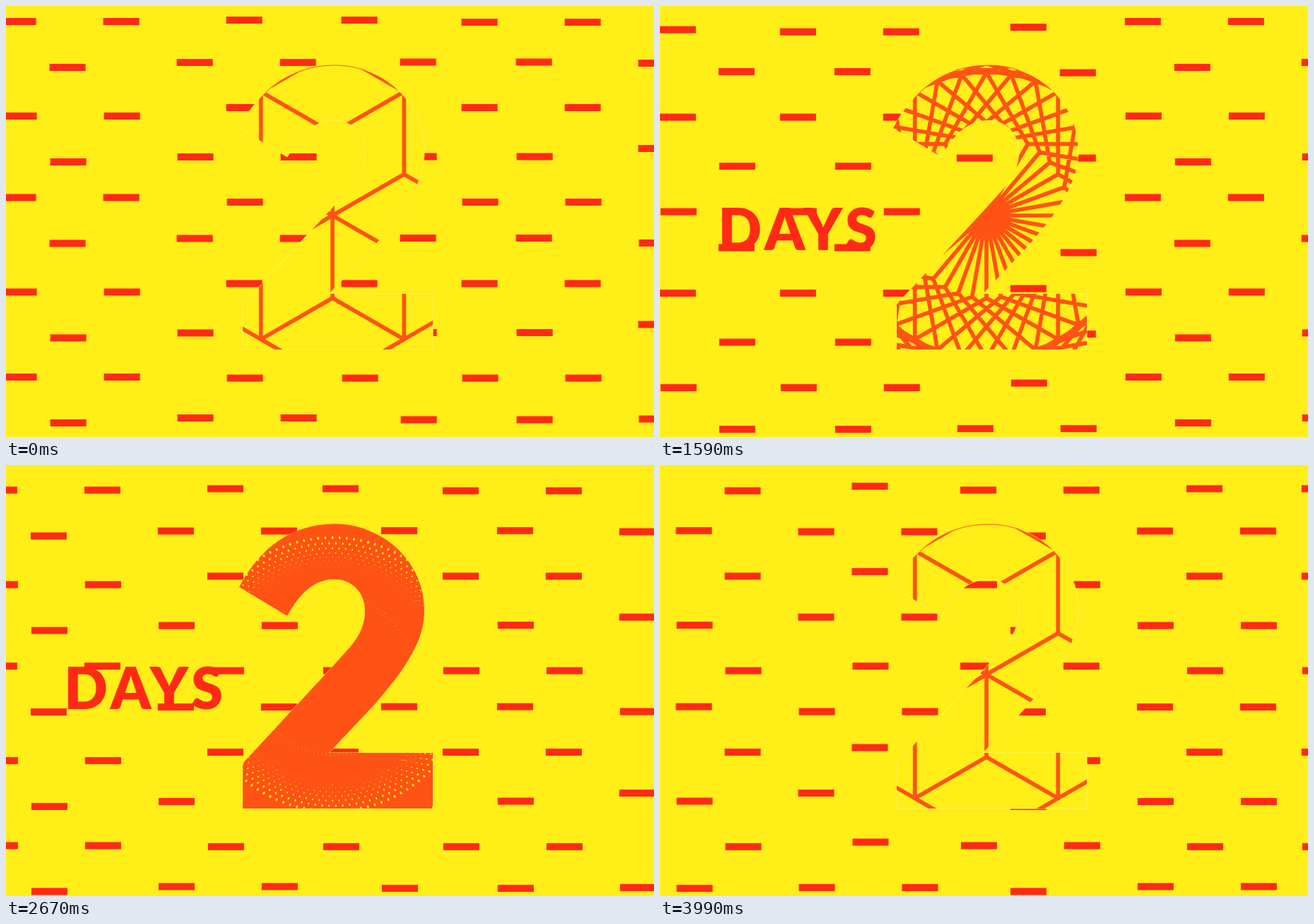
An HTML page with a canvas that plays this animation: 917 by 611 pixels, repeating every 4.02 s.

```html
<!DOCTYPE html>
<html lang="en">
<head>
<meta charset="utf-8">
<title>2 days left</title>
<style>
html, body { margin: 0; width: 100%; height: 100%; overflow: hidden; background: #ffee17; }
canvas { display: block; }
</style>
</head>
<body>
<canvas id="stage" width="917" height="611"></canvas>
<script>
const ctx = document.getElementById('stage').getContext('2d');
const YELLOW = '#ffee17', RED = '#ff2a15', ORANGE = '#ff5215';
const LOOP = 4020, STEP = 30;

const TOP_ARC = 'M330 173 C358 119 404 84 465 84 C535 84 592 138 592 205';
const topArc = new Path2D(TOP_ARC);
const numeral = new Path2D(TOP_ARC +
  ' C592 238 579 264 556 297 C545 312 535 323 523 338 L457 408 H604 V487 H335 V423' +
  ' L460 288 L487 258 C501 241 508 226 508 207 C508 181 490 162 465 162' +
  ' C437 162 417 180 398 214 Z');

// Two kinds of dash column: [y offset, x nudge] per dash
const P = [[0, 0], [134, 1], [249.5, 0], [383.5, 1], [504, 1]];
const Q = [[0, 0], [121, 0], [255, 1], [370.5, 0], [504.5, 1]];

// x, top y, kind, shift of first dash, shift of last dash
const columns = [
  [-8, 22, P], [62, 87, P], [138, 22, P], [242, 80, P],
  [312, 23, Q, -3], [388, 80, P], [475, 23, Q, -3],
  [558, 79.5, P, 0, 3], [645, 23, Q], [722, 79.5, P, 0, 3], [791, 23, Q],
  [895, 81, Q], [971, 16.5, Q], [1041, 81, Q]
];
const SHEET = 1141, DROP = 13.6;

function drawSheet(dx, dy) {
  for (const [x, y, kind, first = 0, last = 0] of columns) {
    kind.forEach(([oy, ox], i) => {
      const shift = i === 0 ? first : i === 4 ? last : 0;
      ctx.fillRect(x + ox + dx - 0.4, y + oy + shift + dy - 5, 51, 10);
    });
  }
}

function drawDashes(t) {
  const turn = 2607, fast = 0.419;
  const late = Math.max(0, t - turn);
  const run = fast * Math.min(t, turn);
  ctx.fillStyle = RED;
  drawSheet(fast * t, 0);
  drawSheet(run + 0.3485 * late - SHEET, DROP);
  if (late) drawSheet(0.3195 * late - SHEET, DROP);
}

// [start time, number of hexagons]
const stages = [[0, 6], [300, 12], [600, 24], [930, 36], [1620, 72], [2340, 120], [2880, 360], [3690, 6]];

// Hexagons that share one corner, turned evenly around it
function drawRosette(n) {
  const cx = 462, cy = 297, side = 117;
  ctx.beginPath();
  for (let i = 0; i < n; i++) {
    let angle = i * 2 * Math.PI / n - Math.PI / 6;
    let x = cx, y = cy;
    ctx.moveTo(x, y);
    for (let k = 0; k < 5; k++) {
      x += side * Math.cos(angle);
      y += side * Math.sin(angle);
      ctx.lineTo(x, y);
      angle -= Math.PI / 3;
    }
    ctx.closePath();
  }
  ctx.strokeStyle = ORANGE;
  ctx.lineWidth = 5.7;
  ctx.lineJoin = 'miter';
  ctx.stroke();
}

function drawNumeral(t) {
  const n = stages.filter(s => s[0] <= t).pop()[1];
  ctx.fillStyle = YELLOW;
  ctx.fill(numeral);
  ctx.strokeStyle = '#fff45e';
  ctx.lineWidth = 1;
  ctx.stroke(numeral);
  ctx.save();
  ctx.clip(numeral);
  drawRosette(n);
  ctx.restore();

  // hairline along the crown
  ctx.save();
  ctx.beginPath();
  ctx.rect(368, 80, 140, 45);
  ctx.clip();
  ctx.strokeStyle = ORANGE;
  ctx.lineWidth = 1;
  ctx.stroke(topArc);
  ctx.restore();
}

function drawWord(word, centers, baseline) {
  ctx.fillStyle = RED;
  ctx.font = '900 81px Lato, sans-serif';
  ctx.textAlign = 'center';
  centers.forEach((x, i) => ctx.fillText(word[i], x, baseline));
}

const between = (t, a, b) => t >= a && t < b;

function draw(t) {
  ctx.fillStyle = YELLOW;
  ctx.fillRect(0, 0, 917, 611);
  drawDashes(t);
  drawNumeral(t);
  if (between(t, 1500, 3510)) drawWord('DAYS', [113, 176.5, 231, 284.5], 346);
  if (between(t, 1740, 2400)) drawWord('LEFT', [650, 701.5, 757.5, 808.5], 354.5);
}

const start = performance.now();
function tick() {
  const t = (performance.now() - start) % LOOP;
  draw(Math.floor(t / STEP) * STEP);
  requestAnimationFrame(tick);
}
tick();
</script>
</body>
</html>
```
